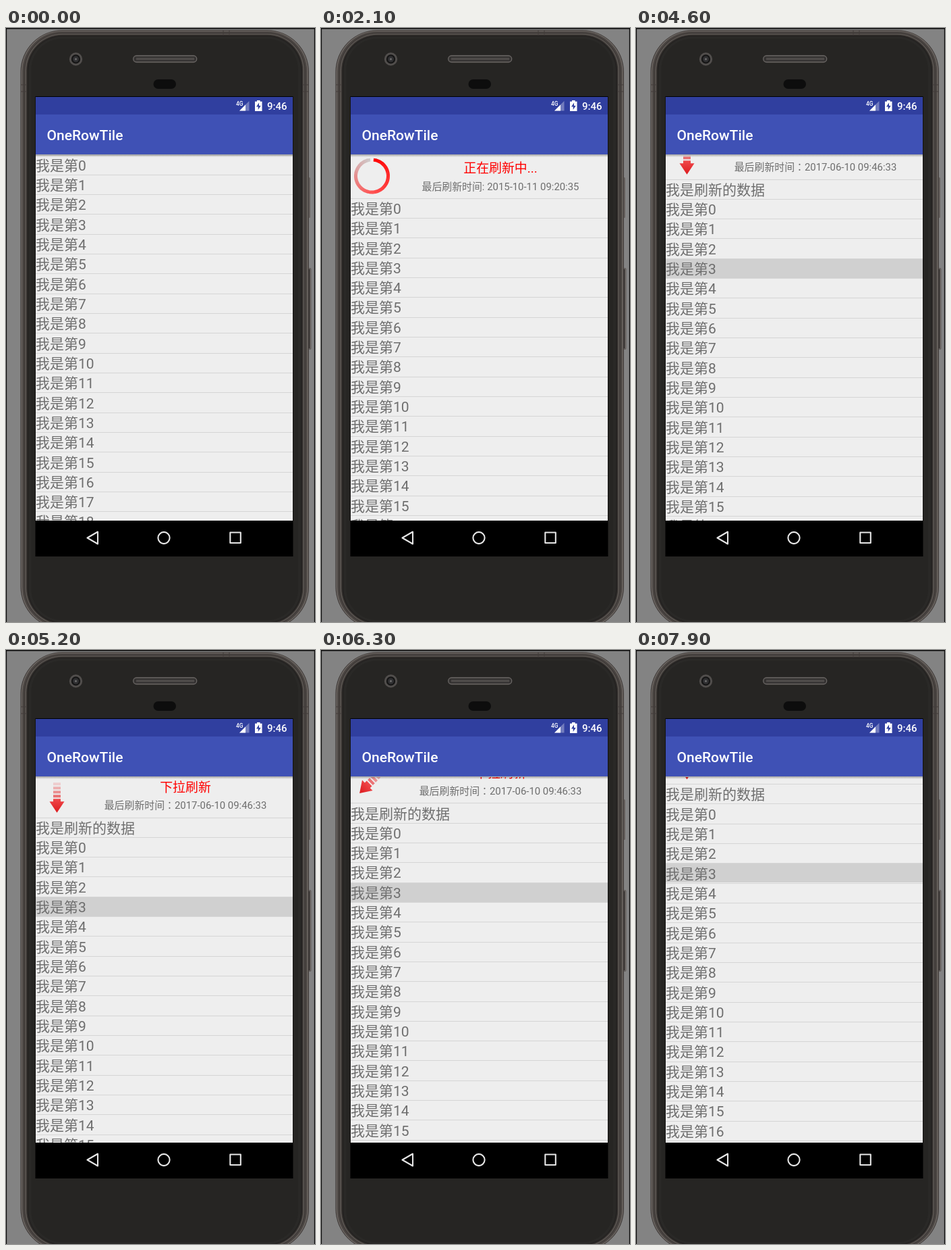
Write an HTML page that moves like this. It is 458 px wide and 879 px high and loops after 8 s.

```html
<!DOCTYPE html>
<html lang="zh-CN">
<head>
<meta charset="utf-8">
<title>Pull to refresh</title>
<style>
html, body { margin: 0; width: 100%; height: 100%; overflow: hidden; background: #838383; }
svg { display: block; width: 458px; height: 879px; }
text { font-family: Roboto, "Noto Sans CJK SC", "Noto Sans CJK", sans-serif; white-space: pre; }
.row { font-size: 21px; fill: #6e6e6e; }
.state { font-size: 18.9px; fill: #f00; text-anchor: middle; }
.stamp { font-size: 14.9px; fill: #6e6e6e; text-anchor: middle; }
.colon { font-family: "Noto Sans CJK TC", sans-serif; }
.bar { font-weight: 500; fill: #fff; }
</style>
</head>
<body>
<svg viewBox="0 0 458 879">
  <defs>
    <clipPath id="view"><rect x="44" y="188" width="381" height="541"/></clipPath>
    <linearGradient id="shade" x2="0" y2="1">
      <stop stop-opacity=".32"/><stop offset="1" stop-opacity="0"/>
    </linearGradient>
    <linearGradient id="red" x2="0" y2="1">
      <stop stop-color="#f0494b"/><stop offset="1" stop-color="#dc1a1e"/>
    </linearGradient>
  </defs>

  <rect width="458" height="879" fill="#838383"/>
  <path d="M0 .75H458M.5 0V879M457.5 0V879" stroke="#0a0a0a" stroke-width="1.3"/>

  <!-- side buttons -->
  <rect x="447" y="221" width="4" height="60" rx="1.5" fill="#67625f"/>
  <rect x="447" y="355" width="5.5" height="121" rx="2" fill="#65605d"/>
  <path d="M449.5 357V474" stroke="#2b2826"/>

  <!-- body -->
  <g id="body"></g>
  <path d="M22 84h9M22 94h9M440 84h9M440 94h9M322 4v7M331 4v7" stroke="#423d3a"/>

  <!-- camera, speaker, sensor -->
  <circle cx="103.5" cy="46" r="8.2" fill="#151515" stroke="#514e4c" stroke-width="3"/>
  <circle cx="103.5" cy="46" r="4.5" fill="#303032"/>
  <circle cx="103.5" cy="46" r="1.6" fill="#6d6d6d"/>
  <rect x="188.7" y="41" width="94" height="9.5" rx="4.7" fill="#353332" stroke="#6b6765" stroke-width="1.3"/>
  <path d="M193 45.7H279" stroke="#504d4b" stroke-width="3"/>
  <rect x="218.5" y="76" width="33.5" height="14" rx="7" fill="#0d0d0d"/>

  <!-- screen -->
  <rect x="43.5" y="101" width="382" height="681" fill="#000"/>
  <rect x="44" y="187" width="381" height="542" fill="#eee"/>
  <g clip-path="url(#view)">
    <g id="list"></g>
    <g id="head">
      <text class="state" id="state" x="266" y="-37.5"></text>
      <text class="stamp" id="oldStamp" x="266" y="-12.2">最后刷新时间: 2015-10-11 09:20:35</text>
      <text class="stamp" id="newStamp" x="266" y="-12.2">最后刷新时间<tspan class="colon" lang="zh-TW">：</tspan>2017-06-10 09:46:33</text>
      <g transform="translate(75.5 -32.7)">
        <g id="arrow" fill="url(#red)">
          <path d="M-5.5 5.500h11v4H11L0 26-11 9.500h5.500z"/>
        </g>
        <g id="ring" fill="none" stroke-width="5"></g>
      </g>
    </g>
  </g>
  <rect x="44" y="187" width="381" height="4" fill="url(#shade)"/>
  <rect x="44" y="102" width="381" height="26" fill="#303f9f"/>
  <rect x="44" y="128" width="381" height="59" fill="#3f51b5"/>
  <text class="bar" x="60.5" y="166" font-size="21">OneRowTile</text>

  <!-- status icons -->
  <text class="bar" x="341" y="115" font-size="8.3">4G</text>
  <path d="M360.5 108V122.500H346z" fill="#fff" opacity=".32"/>
  <path d="M355 113.500V122.500H346z" fill="#fff"/>
  <path d="M372 107h4.500v1.700H379.500V123H369V108.700h3z" fill="#fff"/>
  <path d="M375 110.500l-4 6h2.700v4.500l4-6H375z" fill="#303f9f"/>
  <text class="bar" x="387" y="121" font-size="15">9:46</text>

  <!-- navigation -->
  <g fill="none" stroke="#e6e6e6" stroke-width="2.1" stroke-linejoin="round">
    <path d="M136 745.500V763.500L120.500 754.500z"/>
    <circle cx="234" cy="754.500" r="8.600"/>
    <rect x="332.300" y="746.500" width="15.500" height="15.500"/>
  </g>
</svg>
<script>
const LOOP = 8000, STEP = 100, TOP = 187.5, PITCH = 29.32, HEAD = 64.2;
const BUSY = 2100, DONE = 3100, PRESS = 3900, PRESSED_ROW = 4, TURN = 300;

// [time, pull distance]
const pulls = [
  [0, 0], [600, 0], [700, 5], [1100, 60], [1200, 60], [1300, 66], [2000, 90],
  [2100, HEAD], [3000, HEAD], [3100, 0], [3700, 0], [3800, 5.5], [4100, 28],
  [4400, 28], [4500, 32], [5200, 60], [5300, 79], [5600, 83], [5800, 83],
  [5900, 82], [6400, 28], [6500, 28], [6800, 78], [6900, 85.6], [7200, 90],
  [7300, 90], [7900, 10.6], [8000, 10.6]
];
// [time, arrow angle before, arrow angle after]
const turns = [
  [1300, 0, -180], [DONE, 0, 0], [5300, 0, -180],
  [6100, -180, -360], [6800, 0, -180], [7500, -180, -360]
];

const $ = id => document.getElementById(id);
const show = (el, on) => el.style.display = on ? "" : "none";
function add(parent, tag, attrs) {
  const el = document.createElementNS("http://www.w3.org/2000/svg", tag);
  for (const k in attrs) el.setAttribute(k, attrs[k]);
  return parent.appendChild(el);
}

// nested outlines of the metal rim, [inset, colour]
for (const [d, fill] of [
  [0, "#3f3a38"], [1.2, "#716b67"], [2.6, "#4b4643"], [5, "#403b39"],
  [7, "#5d5854"], [8.5, "#393532"], [10, "#242221"], [12, "#2a2927"], [16, "#262523"]
]) add($("body"), "rect", {
  x: 21.5 + d, y: 3 + d * .8, width: 427.5 - 2 * d, height: 886 - 1.6 * d, rx: 62 - d, fill
});

// fading tail of the arrow
for (let i = 0; i < 4; i++)
  add($("arrow"), "rect", { x: -5.5, y: -18.5 + 6 * i, width: 11, height: 4, fill: "#e8474a", opacity: .2 + .18 * i });

// sweep from red to grey
const SEGS = 72, R = 24, GAP = .1;
const mix = (a, b, p) => Math.round(a + (b - a) * p);
const point = a => `${R * Math.sin(a)} ${-R * Math.cos(a)}`;
for (let i = 0; i < SEGS; i++) {
  const p = i / SEGS, q = Math.max(0, p * 2 - 1), sweep = 2 * Math.PI - 2 * GAP;
  const gb = p < .5 ? mix(0, 80, p * 2) : mix(80, 204, q);
  const a = GAP + p * sweep, b = a + sweep / SEGS + (i < SEGS - 1 ? .015 : 0);
  add($("ring"), "path", {
    d: `M${point(a)}A${R} ${R} 0 0 1 ${point(b)}`,
    stroke: `rgb(${mix(255, 204, q)},${gb},${gb})`
  });
}

const glow = add($("list"), "rect", { x: 44, width: 381, height: 29, fill: "#d0d0d0" });
const rows = Array.from({ length: 20 }, () => ({
  line: add($("list"), "rect", { x: 44, width: 381, height: 1, fill: "#d5d5d5" }),
  label: add($("list"), "text", { class: "row", x: 44 })
}));
const edge = add($("list"), "rect", { x: 44, width: 381, height: 1, fill: "#d5d5d5" });

function pullAt(t) {
  const i = pulls.findIndex(k => k[0] > t);
  const [t0, a] = pulls[i - 1], [t1, b] = pulls[i];
  return a + (b - a) * (t - t0) / (t1 - t0);
}

function angleAt(t) {
  const turn = turns.filter(k => k[0] <= t).pop();
  if (!turn) return 0;
  const p = Math.min(1, (t - turn[0]) / TURN);
  return turn[1] + (turn[2] - turn[1]) * (.5 - .5 * Math.cos(Math.PI * p));
}

function draw(t) {
  const pull = pullAt(t), base = TOP + pull, fresh = t >= DONE;
  const busy = t >= BUSY && t < DONE;

  rows.forEach(({ line, label }, i) => {
    const y = base + i * PITCH;
    line.setAttribute("y", Math.round(y + PITCH));
    label.setAttribute("y", Math.floor(y + 23.7));
    label.textContent = fresh && !i ? "我是刷新的数据" : "我是第" + (fresh ? i - 1 : i);
  });
  edge.setAttribute("y", Math.round(base));
  glow.setAttribute("y", Math.round(base + PRESSED_ROW * PITCH));
  show(glow, t >= PRESS);

  $("head").setAttribute("transform", `translate(0 ${base})`);
  $("state").textContent = busy ? "正在刷新中..." : pull >= HEAD ? "释放刷新" : "下拉刷新";
  show($("oldStamp"), !fresh);
  show($("newStamp"), fresh);
  show($("arrow"), !busy);
  $("arrow").setAttribute("transform", `rotate(${angleAt(t)})`);
  show($("ring"), busy);
  $("ring").setAttribute("transform", `rotate(${(t - BUSY) * .36})`);
}

let start, shown;
function tick(now) {
  start ??= now;
  const t = Math.floor((now - start) % LOOP / STEP) * STEP;
  if (t !== shown) draw(shown = t);
  requestAnimationFrame(tick);
}
draw(0);
requestAnimationFrame(tick);
</script>
</body>
</html>
```
